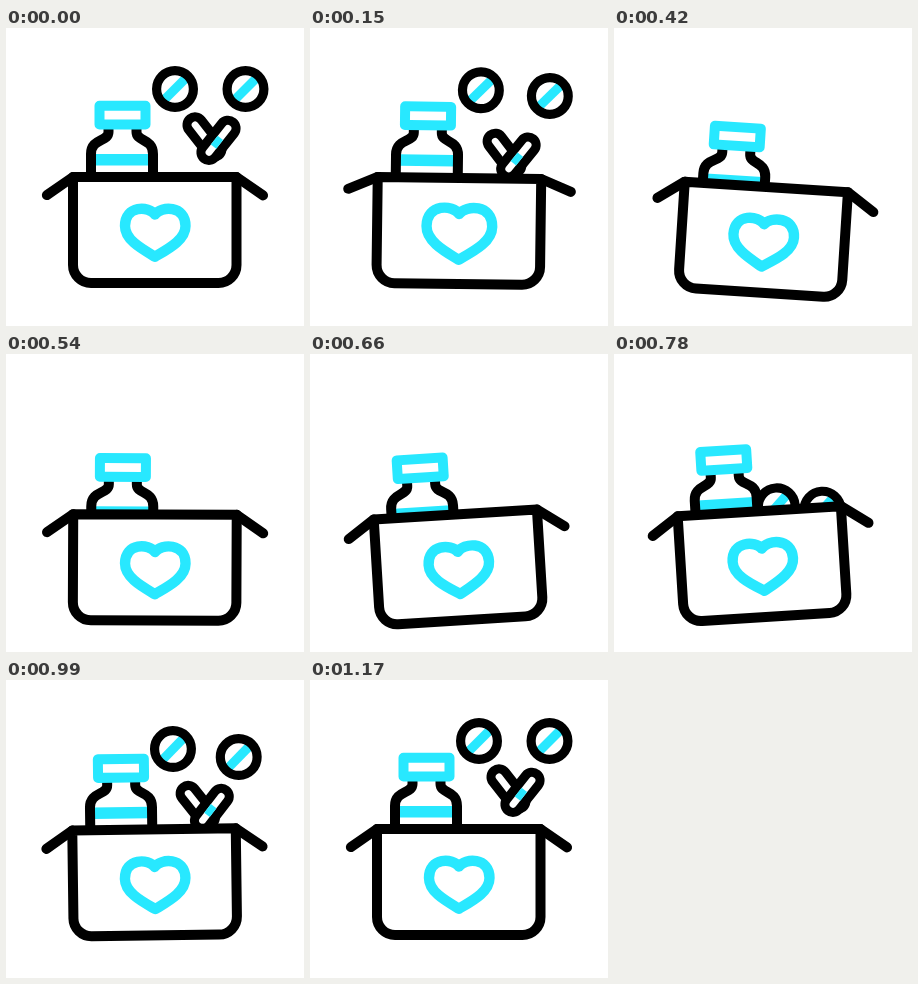
An HTML page for the animation above (1.2 s loop, 298 px wide and 298 px high).

```html
<!DOCTYPE html>
<html lang="en">
<head>
<meta charset="utf-8">
<title>Medicine box</title>
<style>
  html, body { margin: 0; width: 100%; height: 100%; overflow: hidden; background: #fff; }
  svg { display: block; width: 100vw; height: 100vh; }
  .ink, .hue { fill: none; stroke-width: 10; stroke-linecap: round; stroke-linejoin: round; }
  .ink { stroke: #000; }
  .hue { stroke: #28e8ff; }
  .solid { fill: #fff; }
  .butt { stroke-linecap: butt; }
  .thin { stroke-width: 9.2; }
</style>
</head>
<body>
<svg viewBox="0 0 298 298">
  <defs>
    <clipPath id="disc"><circle r="18"/></clipPath>
    <g id="pill">
      <circle r="18" fill="#fff"/>
      <path class="hue butt thin" d="M-18 18L18 -18" clip-path="url(#disc)"/>
      <circle class="ink thin" r="18.4"/>
    </g>
    <rect id="capsule" class="ink solid thin" x="-8" y="-23.3" width="16" height="46.6" rx="8"/>
  </defs>
  <g id="all">
    <g id="bottle">
      <path class="hue butt" d="M88 131.7H144" style="stroke-width:11.5"/>
      <path class="ink butt" d="M102.5 99V104C102.5 114 85 110 85 126V175M130.5 99V104C130.5 114 147 110 147 126V175"/>
      <rect class="hue solid" x="93.5" y="77.8" width="46" height="18.7"/>
    </g>
    <g id="caps">
      <use href="#capsule" transform="translate(198.5 109) rotate(-38)"/>
      <g transform="translate(212.5 112.3) rotate(38.4)">
        <use href="#capsule"/>
        <path class="hue butt" d="M0 -3V8" style="stroke-width:7"/>
      </g>
    </g>
    <g id="left"><use href="#pill" x="169" y="61"/></g>
    <g id="right"><use href="#pill" x="239.5" y="61"/></g>
    <rect class="ink solid" x="67" y="149" width="163.5" height="106"/>
    <path id="flapL" class="ink" d="M67 149H35.2"/>
    <path id="flapR" class="ink" d="M230.5 149H262.8"/>
    <path id="heart" class="hue" d="M149 186.5C143 178 119 177 119 198C119 212 136 221 149 228.7C162 221 179.5 212 179.5 198C179.5 177 155 178 149 186.5Z"/>
  </g>
</svg>
<script>
const LOOP = 1200, TICK = 30;
const $ = id => document.getElementById(id);

// The box has square top corners and round bottom ones.
const box = document.querySelector("#all > rect");
const body = document.createElementNS(box.namespaceURI, "path");
body.setAttribute("class", "ink solid");
body.setAttribute("d", "M67 149H230.5V237A18 18 0 0 1 212.5 255H85A18 18 0 0 1 67 237Z");
box.replaceWith(body);

// Sine ease from 0 to 1 between times a and b.
function ease(t, a, b) {
  const p = Math.min(1, Math.max(0, (t - a) / (b - a)));
  return (1 - Math.cos(Math.PI * p)) / 2;
}

// Rises from a to b, holds, and falls back from c to d.
const swell = (t, a, b, c, d) => ease(t, a, b) - ease(t, c, d);

const place = (id, transform) => $(id).setAttribute("transform", transform);
const drop = (id, y, drift = 0) => place(id, `translate(${drift * y} ${y})`);

function draw(t) {
  const tilt = 3.7 * swell(t, 30, 435, 435, 560) - 4 * swell(t, 560, 690, 690, 1110);
  const sink = 11.5 * swell(t, 60, 540, 630, 1040);
  const open = swell(t, 30, 240, 240, 435);
  const flap = 34.7 - 19.7 * open;
  const beat = 1 + 0.14 * open;

  place("all", `translate(0 ${sink}) rotate(${tilt} 149 205)`);
  drop("bottle", 15 * swell(t, 120, 500, 570, 1030));
  drop("left", 125 * swell(t, 150, 430, 600, 1065), -0.03);
  drop("right", 119 * swell(t, 110, 420, 620, 1110), -0.305);
  drop("caps", 88 * swell(t, 50, 420, 690, 1110), -0.34);
  place("flapL", `rotate(${-flap} 67 149)`);
  place("flapR", `rotate(${flap} 230.5 149)`);
  place("heart", `translate(149 204) scale(${beat}) translate(-149 -204)`);
  $("heart").style.strokeWidth = 10.4 / beat;
}

const start = performance.now();
function frame() {
  const t = (performance.now() - start) % LOOP;
  draw(Math.floor(t / TICK) * TICK);
  requestAnimationFrame(frame);
}
frame();
</script>
</body>
</html>
```
